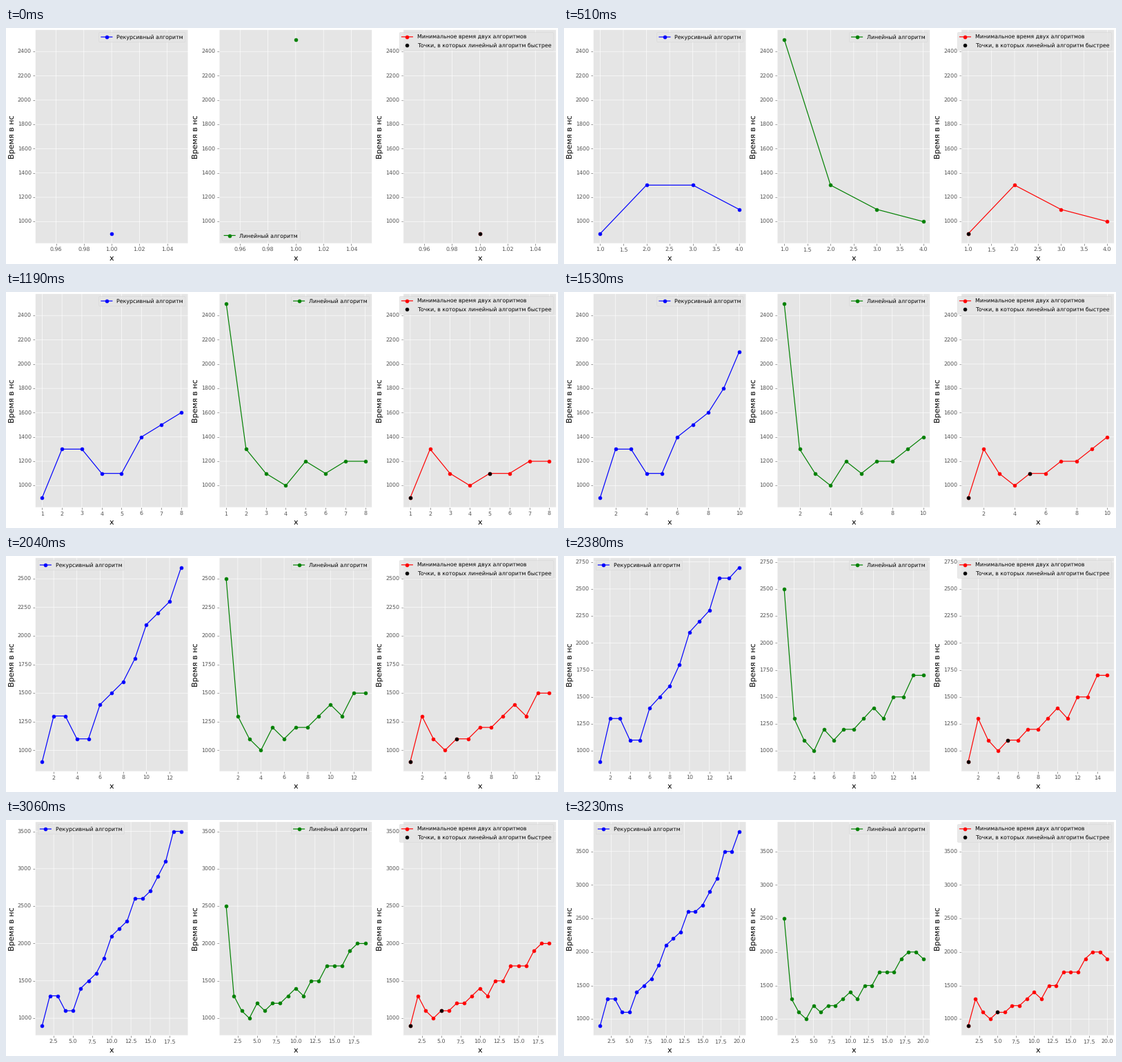
These frames come from a looping animation (800x343 px, 3.58 s). A matplotlib script:

```python
import matplotlib.pyplot as plt
import numpy as np
from matplotlib.animation import FuncAnimation

WIDTH, HEIGHT = 800, 343
DPI = WIDTH / 14
LOOP_MS, TICK_MS, STEP_MS = 3580, 20, 170

recursive = 100 * np.array([9, 13, 13, 11, 11, 14, 15, 16, 18, 21,
                            22, 23, 26, 26, 27, 29, 31, 35, 35, 38])
linear = 100 * np.array([25, 13, 11, 10, 12, 11, 12, 12, 13, 14,
                         13, 15, 15, 17, 17, 17, 19, 20, 20, 19])
fastest = np.minimum(recursive, linear)
x = np.arange(1, len(recursive) + 1)

plt.style.use("ggplot")
plt.rcParams.update({
    "font.family": "DejaVu Sans",
    "text.hinting": "no_hinting",
    "path.snap": False,
    "axes.labelsize": 14,
    "axes.labelcolor": "black",
})

fig = plt.figure(figsize=(WIDTH / DPI, HEIGHT / DPI), dpi=DPI, facecolor="white")


def add_panel(left):
    """Axes placed by its left edge in pixels; all panels share one size."""
    ax = fig.add_axes([left / WIDTH, 29.9 / HEIGHT, 221.6 / WIDTH, 310.7 / HEIGHT])
    ax.set_xlabel("x")
    ax.set_ylabel("Время в нс")
    return ax


panels = [add_panel(42.3 + 266.75 * i) for i in range(3)]
series = [
    (recursive, "blue", "Рекурсивный алгоритм"),
    (linear, "green", "Линейный алгоритм"),
    (fastest, "red", "Минимальное время двух алгоритмов"),
]
lines = [ax.plot([], [], "o-", color=color, label=label)[0]
         for ax, (_, color, label) in zip(panels, series)]
marks, = panels[2].plot([], [], "o", color="black",
                        label="Точки, в которых линейный алгоритм быстрее")
legends = [ax.legend(loc="upper right") for ax in panels]


def padded(low, high):
    margin = 0.05 * (high - low)
    return low - margin, high + margin


def update(frame):
    # Sample mid-tick so steps fall on the nearest tick boundary.
    step = int((frame + 0.5) * TICK_MS // STEP_MS)
    n = min(step + 1, len(x))

    for line, (values, _, _) in zip(lines, series):
        line.set_data(x[:n], values[:n])
    chosen = recursive[:n] < linear[:n]
    marks.set_data(x[:n][chosen], fastest[:n][chosen])

    xlim = padded(1, n) if n > 1 else (0.945, 1.055)
    ylim = padded(fastest[:n].min(), max(recursive[:n].max(), linear[:n].max()))
    for ax in panels:
        ax.set(xlim=xlim, ylim=ylim)

    legends[0].set_loc("upper left" if n >= 13 else "upper right")
    legends[1].set_loc("lower left" if n == 1 else "upper right")
    return [*lines, marks, *legends]


animation = FuncAnimation(fig, update, frames=LOOP_MS // TICK_MS,
                          interval=TICK_MS, repeat=True, repeat_delay=0)
plt.show()
```
